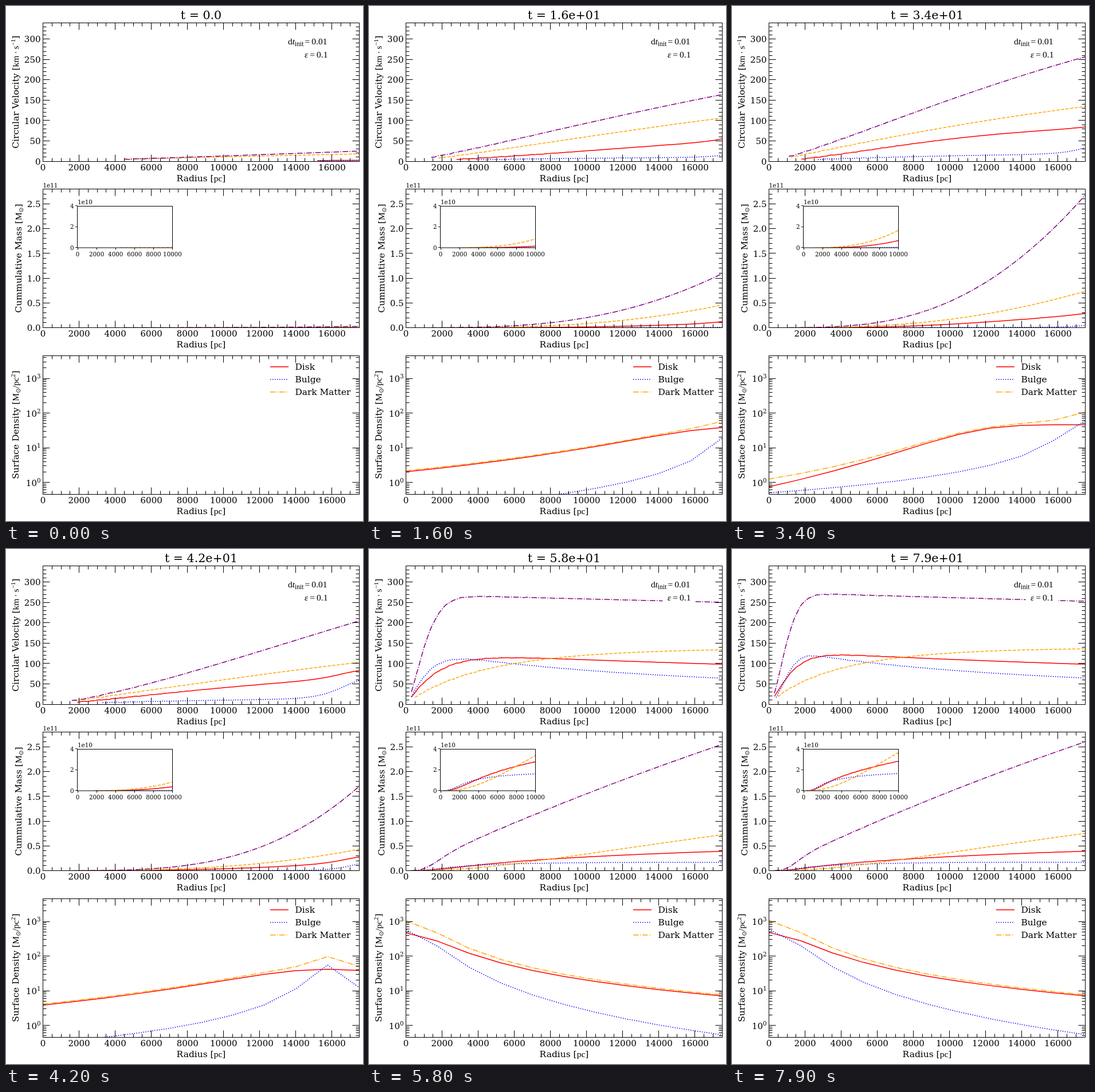
An HTML page that plays this animation: 623 px wide and 899 px high, repeating every 8 s.

```html
<!DOCTYPE html>
<html lang="en">
<head>
<meta charset="utf-8">
<title>Galaxy profiles</title>
<style>
  html, body { margin: 0; width: 100%; height: 100%; overflow: hidden; background: #fff; }
  svg { display: block; width: 623px; height: 899px; }
  text { font-family: "DejaVu Serif", serif; font-size: 15px; fill: #000; }
  .label { font-size: 15.5px; text-anchor: middle; }
  .legend { font-size: 15.4px; }
  .small { font-size: 10.3px; }
  .title { font-size: 20.6px; text-anchor: middle; }
  .math { font-family: "Liberation Serif", serif; }
  .note { font-size: 15.5px; }
  .sun { font: 10.5px "DejaVu Sans", sans-serif; }
  .mid { text-anchor: middle; }
  .end { text-anchor: end; }
  .axis { fill: none; stroke: #000; stroke-width: 1; }
  .curve { fill: none; stroke-width: 1.5; stroke-linejoin: round; }
  .disk { stroke: #f00; }
  .bulge { stroke: #00f; stroke-dasharray: 1.5 2.5; }
  .dark { stroke: #ffa500; stroke-dasharray: 5.6 2.4; }
  .sum { stroke: #ffa500; stroke-dasharray: 9.6 2.4 1.5 2.4; }
  .total { stroke: #800080; stroke-dasharray: 9.6 2.4 1.5 2.4; }
</style>
</head>
<body>
<svg id="stage" viewBox="0 0 623 899"></svg>
<script>
const stage = document.getElementById('stage');
const G = 0.0043;       // pc (km/s)^2 per solar mass
const RMAX = 17.5;      // kpc
const LEFT = 64.5, RIGHT = 616.5;

function add(tag, attrs, content, parent = stage) {
  const el = document.createElementNS('http://www.w3.org/2000/svg', tag);
  for (const key in attrs) el.setAttribute(key, attrs[key]);
  if (content !== undefined) el.innerHTML = content;
  parent.appendChild(el);
  return el;
}
const text = (x, y, cls, content, extra) => add('text', { x, y, class: cls, ...extra }, content);
const range = (from, to, step) =>
  Array.from({ length: Math.floor((to - from) / step + 1e-6) + 1 }, (_, i) => from + i * step);

// ---- model: two galaxies fall together, swing apart once and merge ----

// Distance of each galaxy from the common centre, in kpc.
function separation(t) {
  const PASS = 20, arc = u => 18.66 - .0592 * (u - 36.4) ** 2;
  return t < PASS ? arc(PASS) + 4.2 * (PASS - t) : t < 54 ? Math.max(0, arc(t)) : 0;
}

// Rotation speed: rises over the scale a with power p, then decays with k.
// The lump is the mass that the galaxy cores add outside their distance R.
function speed(r, [v, a, p, k = 0], R) {
  const lump = R > 1.5 ? Math.min(1, R / 6) * (r / R) ** (R + 1.5) : 0;
  return v / (1 + k * r) * (1 - Math.exp(-((r / a) ** p) - lump));
}

// Logarithm of the surface density around the galaxy core.
const density = (r, [peak, fall, width, power = 2], R) =>
  peak - fall * Math.log(1 + (Math.abs(r - Math.max(0, R - 1)) / width) ** power);

const distant = { sDisk: [1.6, .55, 6, 2], sBulge: [1.8, .38, .6] };
const steady = { sDisk: [2.68, .42, 2, 2], sBulge: [2.77, .65, 1.7] };
const linear = u => u;
const easeOut = n => u => 1 - (1 - u) ** n;

const poses = [];
const pose = (time, ease, parts) => poses.push({ time, ease, parts });

pose(0, linear, {
  disk: [110, 400, 1.25, 0], bulge: [120, 560, 1, .05],
  dark: [250, 268, .95], total: [400, 172, 1.2, 0], ...distant
});
pose(16, easeOut(2), {
  disk: [110, 25, 1.45, 0], bulge: [120, 105, 1, .05],
  dark: [250, 28.1, 1.25], total: [400, 29.6, 1.22, 0], ...distant
});
pose(27, linear, {
  disk: [96, 8, 1.7, 0], bulge: [120, 35, 1.1, .05],
  dark: [250, 15.2, 1.05], total: [400, 13.7, 1.1, 0],
  sDisk: [1.7, .5, 8.5, 6], sBulge: [1.85, .28, .6]
});
pose(42, linear, {
  disk: [85, 13.6, 1.4, 0], bulge: [120, 62, 1.1, .05],
  dark: [250, 30.1, 1.17], total: [600, 32.4, 1.42, 0],
  sDisk: [1.62, .5, 6, 2], sBulge: [1.74, .38, .8]
});
pose(50, easeOut(6), {
  disk: [123, 14, 1, .014], bulge: [120, 12, 1.6, .05],
  dark: [136, 7, 1.5], total: [275, 5.55, 1.95, .0047],
  sDisk: [2.21, .25, .8, 2], sBulge: [2.09, .45, .9]
});
pose(67, linear, {
  disk: [129, 1.45, 1.1, .018], bulge: [140, 1.03, 1.3, .068],
  dark: [138, 4.5, .91], total: [270, 1.14, 1.5, .0045], ...steady
});
pose(79, linear, {
  disk: [132, 1.3, 1.3, .0197], bulge: [141, 1.17, 1.9, .068],
  dark: [139, 3.95, .91], total: [275, 1.12, 1.7, .005], ...steady
});

function partsAt(time) {
  const i = Math.max(1, poses.findIndex(p => p.time >= time));
  const a = poses[i - 1], b = poses[i];
  const u = a.ease((time - a.time) / (b.time - a.time));
  const mixed = {};
  for (const key in a.parts)
    mixed[key] = a.parts[key].map((v, k) => v + (b.parts[key][k] - v) * u);
  return mixed;
}

const wobble = (r, seed) =>
  1.2 * Math.max(0, 1 - r / 11) * Math.sin(r * 11 + seed * 2) * Math.sin(r * 4.3 + seed);

// Points [kpc, km/s]; a curve starts where it encloses its first particle.
function rotation(params, R, first, seed) {
  return [...range(.1, RMAX, .1), RMAX]
    .map(r => [r, speed(r, params, R)])
    .filter(([r, v]) => v * v * r >= first)
    .map(([r, v]) => [r, v + wobble(r, seed)]);
}
const line = pts => pts.length
  ? 'M' + pts.map(p => p[0].toFixed(2) + ' ' + p[1].toFixed(2)).join('L') : '';

// ---- scales ----
const px = kpc => LEFT + kpc * 31.53;
const speedY = v => 271 - v * .711;
const massY = m => 561.5 - m * 86.4e-11;
const densY = log => 831.5 - log * 60.5;
const insetX = kpc => 125 + kpc * 16.55;
const insetY = m => 422 - m * 18.25e-10;
const snap = v => Math.floor(v) + .5;

// ---- static chart ----
const PANELS = [[29.5, 271], [319.5, 561.5], [610, 852.5]].map(p => p.map(snap));
const INSET = { x: 124.5, y: 349.5, width: 166, height: 72.5 };
const defs = add('defs', {});
const boxes = PANELS.map(([y, bottom]) => ({ x: LEFT, y, width: RIGHT - LEFT, height: bottom - y }));
[...boxes, INSET].forEach((box, i) =>
  add('rect', box, undefined, add('clipPath', { id: 'clip' + i }, undefined, defs)));
const layers = [0, 1, 2, 3].map(i => add('g', { 'clip-path': `url(#clip${i})` }));

const NAMES = ['disk', 'bulge', 'dark', 'total'];
const curve = (layer, cls) => add('path', { class: 'curve ' + cls }, undefined, layers[layer]);
const speedPaths = NAMES.map(n => curve(0, n));
const massPaths = NAMES.map(n => curve(1, n));
const insetPaths = NAMES.slice(0, 3).map(n => curve(3, n));
const densPaths = ['disk', 'bulge', 'sum'].map(n => curve(2, n));

let ticks = '';
const tickSize = major => major ? 12 : 6;
function xTick(x, top, bottom, len) {
  ticks += `M${snap(x)} ${bottom}v${-len}M${snap(x)} ${top}v${len}`;
}
function yTick(y, len) {
  ticks += `M${LEFT} ${snap(y)}h${len}M${RIGHT} ${snap(y)}h${-len}`;
}
PANELS.forEach(([top, bottom]) => {
  for (const r of range(0, RMAX, .5)) xTick(px(r), top, bottom, tickSize(r % 2 === 0));
  for (const r of range(0, 16, 2)) text(px(r), bottom + 15.5, 'mid', r * 1000);
  text(340.5, bottom + 34.5, 'label', 'Radius [<tspan class="math">pc</tspan>]');
});
for (const v of range(0, 340, 10)) yTick(speedY(v), tickSize(v % 50 === 0));
for (const v of range(0, 300, 50)) text(60.5, speedY(v) + 5.6, 'end', v);
for (let i = 0; i <= 28; i++) yTick(massY(i * 1e10), tickSize(i % 5 === 0));
for (const m of range(0, 2.5, .5)) text(60.5, massY(m * 1e11) + 5.6, 'end', m.toFixed(1));
for (let d = -1; d <= 3; d++) {
  for (let k = 1; k < 10; k++) {
    const y = densY(d + Math.log10(k));
    if (y > 610 && y < 852.5) yTick(y, tickSize(k === 1));
  }
  if (d >= 0) text(60.5, densY(d) + 6, 'end', `10<tspan class="small" dy="-6">${d}</tspan>`);
}
add('path', { class: 'axis', d: ticks });
boxes.forEach(box => add('rect', { ...box, class: 'axis' }));

let insetTicks = '';
for (const r of range(0, 10, 2)) {
  insetTicks += `M${snap(insetX(r))} 422v3.5`;
  text(insetX(r), 437, 'small mid', r * 1000);
}
for (const m of [0, 2, 4]) {
  const y = insetY(m * 1e10);
  insetTicks += `M124.5 ${snap(y - .5)}h-3.5`;
  text(118.5, y + 3.9, 'small end', m);
}
add('path', { class: 'axis', d: insetTicks });
add('rect', { ...INSET, class: 'axis' });
text(125, 346, 'small', '1e10');
text(LEFT, 317, 'small', '1e11');

const sun = 'M<tspan class="sun" dy="3">⊙</tspan>';
const up = s => `<tspan font-size="11" dy="-5.5">${s}</tspan>`;
function yLabel(x, y, content) {
  text(0, 0, 'label', content, { transform: `translate(${x} ${y}) rotate(-90)` });
}
yLabel(21.5, 150.2, `Circular Velocity [<tspan class="math">km\u2009·\u2009s${up('−1')}</tspan><tspan dy="5.5">]</tspan>`);
yLabel(27, 440.5, `Cummulative Mass [<tspan class="math">${sun}</tspan><tspan dy="-3">]</tspan>`);
yLabel(21.5, 731.2, `Surface Density [<tspan class="math">${sun}<tspan dy="-3">/pc</tspan>${up('2')}</tspan><tspan dy="5.5">]</tspan>`);

// notes sit on white boxes that hide the curves
add('rect', { x: 484, y: 52, width: 85, height: 24, fill: '#fff' });
add('rect', { x: 512.5, y: 74, width: 57, height: 24, fill: '#fff' });
text(492, 67, 'math note', 'd<tspan font-style="italic">t</tspan><tspan font-size="11.5" dy="2.5">init</tspan>');
text(560.5, 67, 'math note end', '=\u20090.01');
text(521, 89.5, 'math note', '<tspan font-style="italic">ε</tspan>');
text(561.5, 89.5, 'math note end', '=\u20090.1');

[['disk', 'Disk'], ['bulge', 'Bulge'], ['sum', 'Dark Matter']].forEach(([cls, name], i) => {
  add('path', { class: 'curve ' + cls, d: `M461 ${629.8 + i * 22}h32` });
  text(504.5, 635.4 + i * 22, 'legend', name);
});
const title = text(340.5, 23, 'title', '');

// ---- animation ----
function draw(time) {
  const parts = partsAt(time), R = separation(time);
  NAMES.forEach((name, k) => {
    const isCore = k < 2;
    const speeds = rotation(parts[name], isCore ? R : 0, isCore ? 50 : 110, time + k);
    const masses = speeds.map(([r, v]) => [r, v * v * r * 1000 / G]);
    speedPaths[k].setAttribute('d', line(speeds.map(([r, v]) => [px(r), speedY(v)])));
    massPaths[k].setAttribute('d', line(masses.map(([r, m]) => [px(r), massY(m)])));
    if (k < 3) insetPaths[k].setAttribute('d', line(masses.map(([r, m]) => [insetX(r), insetY(m)])));
  });

  const bins = range(0, RMAX, RMAX / 10);
  const disk = bins.map(r => density(r, parts.sDisk, R));
  const bulge = bins.map(r => density(r, parts.sBulge, R));
  const sum = disk.map((d, i) => Math.log10(10 ** d + 10 ** bulge[i]));
  [disk, bulge, sum].forEach((logs, k) =>
    densPaths[k].setAttribute('d', line(logs.map((v, i) => [px(bins[i]), densY(v)]))));

  title.textContent = 't = ' + (time < 10 ? time.toFixed(1) : time / 10 + 'e+01');
}

let shown = -1;
function tick() {
  const step = Math.floor(performance.now() % 8000 / 100);
  if (step !== shown) draw(shown = step);
  requestAnimationFrame(tick);
}
tick();
</script>
</body>
</html>
```
